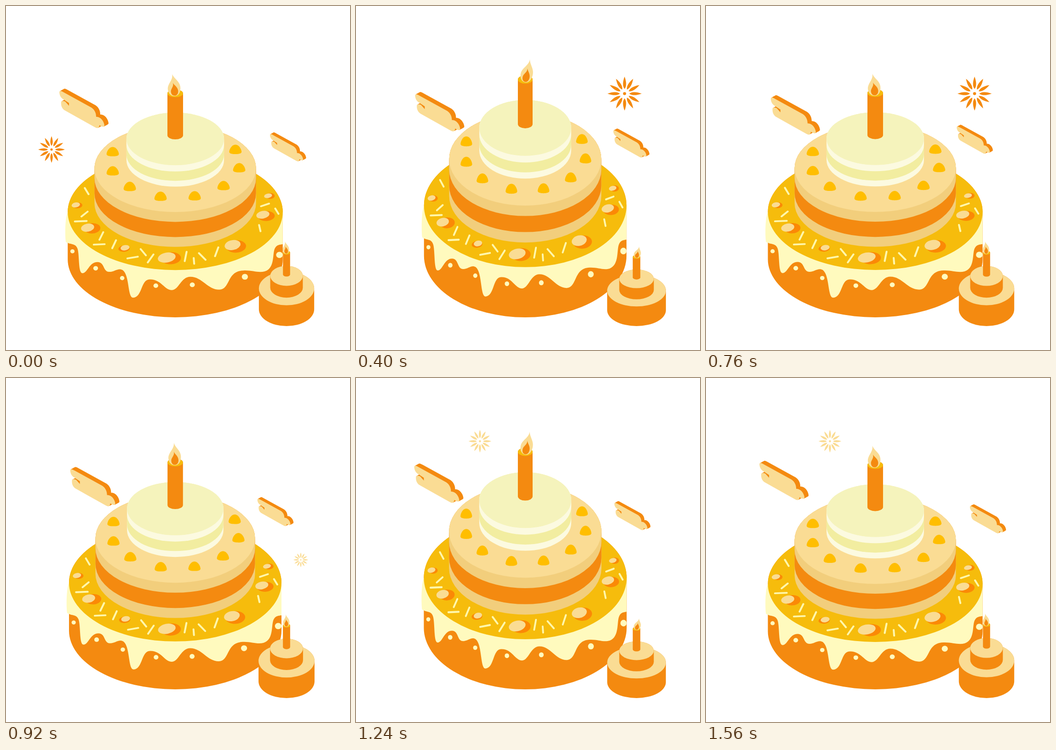
These frames come from a looping animation (748x748 px, 1600 ms). An HTML page:

```html
<!DOCTYPE html>
<html lang="en">
<head>
<meta charset="utf-8">
<title>Birthday cake</title>
<style>
  html, body { margin: 0; height: 100%; overflow: hidden; background: #fff; }
  svg { display: block; width: 100%; height: 100%; }
</style>
</head>
<body>
<svg id="stage" viewBox="0 0 748 748"></svg>
<script>
const ORANGE = '#f48a10', YELLOW = '#f6bc0c', PEACH = '#fadc94', TAN = '#f2ce7c',
      ICING = '#fffabe', CREAM = '#f5f3bc', PALE = '#fcfae0', LEMON = '#f2eda0';
const LOOP = 1600, STEP = 40;

// Cylinder silhouette from the centre of its top ellipse to that of its bottom one.
const drum = (x, top, bottom, rx, ry, fill) =>
  `<path fill="${fill}" d="M${x - rx} ${top}A${rx} ${ry} 0 0 1 ${x + rx} ${top}V${bottom}A${rx} ${ry} 0 0 1 ${x - rx} ${bottom}Z"/>`;
const disc = (x, y, rx, ry, fill, turn = 0) =>
  `<ellipse cx="${x}" cy="${y}" rx="${rx}" ry="${ry}" fill="${fill}" transform="rotate(${turn} ${x} ${y})"/>`;
const shape = (d, fill, extra = '') => `<path d="${d}" fill="${fill}" ${extra}/>`;

const flame = (x, y, size) => `<g transform="translate(${x} ${y}) scale(${size})"><g class="flame">` +
  shape('M2-49C4-37 15-31 14-17C13-6 8 1 0 1C-8 1-14-6-13-17C-11-30 2-35 2-49Z', PEACH) +
  shape('M0-29C2-23 8-19 8-11C8-4 4 0 0 0C-5 0-8-4-7.500-10C-7-17 1-20 0-29Z', ORANGE) + '</g></g>';

const berry = ([x, y]) => shape('M0-11C8-11 13 0 13 5C13 9 6 10 0 10C-6 10-13 9-13 5C-13 0-8-11 0-11Z',
  '#ffbe00', `transform="translate(${x} ${y})"`);
const berries = [[236, 306], [236, 349], [272, 384], [337, 406], [409, 405], [470, 382], [503, 342], [495, 301]];

// x, y, rx, ry of the nut, then x, y, rx, ry of its shadow
const nuts = [
  [183, 476, 14, 9, 193, 477.5, 17, 11.5], [158, 425, 9, 5.5, 162, 426, 10, 6.5],
  [262, 521, 9.5, 6, 260, 523, 12, 7], [350, 543, 19, 11, 359, 544.5, 21, 13.5],
  [489, 515, 17, 11, 496.5, 518, 21, 14], [553, 447, 14, 8.5, 560.5, 450, 17.5, 11],
  [564, 404.5, 8.5, 5, 568.5, 405, 9.5, 6.5]];
const nut = n => disc(...n.slice(4), '#fb8906', -4) + disc(...n.slice(0, 4), PEACH, -12);

const sprinkles = 'M177 387l8 14M170 451l13-11M156 462l25-1M216 486l-8 17M196 514l23-1M243 504l-8 18' +
  'M267 545l22-4M295 524l11 14M322 536l-12 18M392 530l-4 21M407 544l1 13M418 533l14 15M459 520l-7 20' +
  'M549 428l17-6M579 433l7 12M545 470l3 14';

const icing = 'M141 441C135 455 135 495 137 508C147 515 158 510 162 524C166 540 163 578 172 578' +
  'C183 578 186 553 204 553C219 553 215 574 228 575C239 576 247 565 257 571C272 582 267 633 279 633' +
  'C299 632 295 592 314 592C338 591 345 616 361 616C376 615 380 586 400 586C425 586 436 615 461 615' +
  'C485 614 476 573 512 572C530 571 543 578 557 574C580 566 572 532 579 521C583 514 589 514 595 513V441Z';
const dots = [[151, 529, 4.5], [200, 567, 5], [256, 589, 4.7], [327, 606, 5], [404, 604, 5.3], [515, 586, 6.5], [588, 537, 7]];

const bigCake =
  drum(368, 441, 547, 227, 130, ORANGE) + shape(icing, ICING) +
  dots.map(([x, y, r]) => disc(x, y, r, r, ICING)).join('') +
  disc(368, 441, 227, 130, YELLOW) + nuts.map(nut).join('') +
  shape(sprinkles, 'none', `stroke="#fff7ac" stroke-width="4" stroke-linecap="round"`) +
  drum(368, 343, 421, 170.5, 98, TAN) + drum(368, 343, 399, 170.5, 98, ORANGE) +
  drum(368, 343, 365, 170.5, 98, TAN) + disc(368, 343, 170.5, 98, PEACH) +
  berries.map(berry).join('') +
  drum(368, 277, 325, 103, 59, PALE) + drum(368, 277, 312, 103, 59, LEMON) +
  drum(368, 277, 291, 103, 59, PALE) + disc(368, 277, 103, 59, CREAM) +
  drum(368, 175, 269, 16.5, 9, ORANGE) + disc(368, 175, 16.5, 8.5, YELLOW) + flame(368, 180, 1);

const smallCake =
  drum(610, 616.5, 660.5, 62, 35.5, ORANGE) + disc(610, 616.5, 62, 35.5, PEACH) +
  drum(610, 590, 615, 36.5, 21, ORANGE) + disc(610, 590, 36.5, 21, PEACH) +
  drum(610, 541, 587, 8, 4.5, ORANGE) + disc(610, 541, 8, 4, YELLOW) + flame(610, 543, 0.53);

// Slab: the front face over copies of itself pushed back to the upper right.
const face = 'M0 7C1 3 5 5 10 8L70 41C77 46 80 53 80 61C88 60 97 69 98 80C97 84 93 83 87 79' +
  'C87 85 83 87 78 84L12 47C5 43 3 35 4 28C6 26 9 26 13 28L21 37V31L9 23C3 20 0 13 0 7Z';
const slab = [...Array(10).keys()].reverse()
  .map(i => shape(face, i ? ORANGE : PEACH, `transform="translate(${i} ${-i * 0.55})"`)).join('');

const petals = [...Array(12).keys()]
  .map(i => `<path d="M0-29C3.500-20 3.500-12 0-8C-3.500-12-3.500-20 0-29Z" transform="rotate(${i * 30})"/>`).join('');
const bursts = [[99, 312, 1, ORANGE], [584, 190.5, 1.28, ORANGE], [641, 395.5, 0.55, PEACH], [269.5, 137.5, 0.85, PEACH]];
const burst = ([x, y, size, fill]) =>
  `<g class="burst" fill="${fill}" transform="translate(${x} ${y}) scale(${size})">${petals}<circle r="2.600"/></g>`;

const stage = document.getElementById('stage');
stage.innerHTML = bursts.map(burst).join('') +
  `<g id="cloudL">${slab}</g><g id="cloudR">${slab}</g><g id="big">${bigCake}</g><g id="small">${smallCake}</g>`;

const all = selector => [...stage.querySelectorAll(selector)];
const place = (selector, transform) => all(selector).forEach(el => el.setAttribute('transform', transform));
const squash = (x, y, k) => `translate(${x} ${y}) scale(${1 + k} ${1 - k}) translate(${-x} ${-y})`;

function draw(now) {
  const t = Math.floor(now % LOOP / STEP) * STEP;
  const bounce = Math.cos(2 * Math.PI * t / 800);
  const drift = (1 - Math.cos(2 * Math.PI * t / LOOP)) / 2;
  place('#big', squash(368, 677, 0.03 * bounce));
  place('#small', squash(610, 696, -0.03 * bounce));
  place('.flame', `rotate(${-10 * bounce})`);
  place('#cloudL', `translate(${116 + 25 * drift} ${180 + 14.4 * drift})`);
  place('#cloudR', `translate(${574 - 29 * drift} ${275 - 16.7 * drift}) scale(0.735)`);
  all('.burst').forEach((el, i) => el.style.display = i === Math.floor(t / 400) ? '' : 'none');
}

const start = performance.now();
function tick() {
  draw(performance.now() - start);
  requestAnimationFrame(tick);
}
tick();
</script>
</body>
</html>
```
